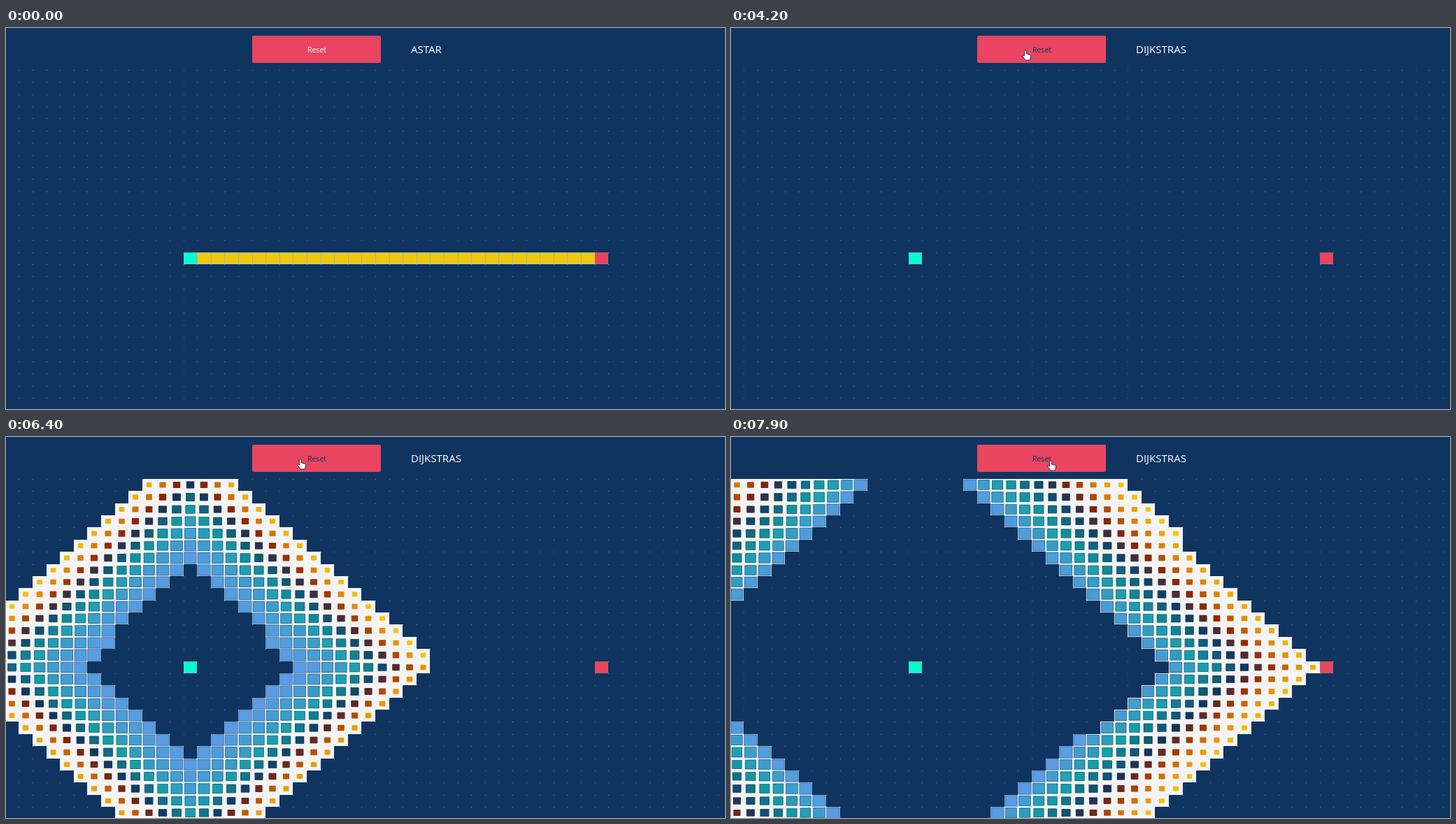
Animation, 1028 px wide and 545 px high, one loop 8000 ms. Source, as an HTML page with a canvas:

```html
<!DOCTYPE html>
<html lang="en">
<head>
<meta charset="utf-8">
<title>Pathfinding</title>
<style>
  html, body { margin: 0; width: 100%; height: 100%; overflow: hidden; background: #0f3460; }
  canvas, svg { position: absolute; left: 0; top: 0; width: 1028px; height: 545px; }
  text { font-family: "Open Sans", "Noto Sans", sans-serif; fill: #fff; }
</style>
</head>
<body>
<canvas id="grid" width="1028" height="545"></canvas>
<svg viewBox="0 0 1028 545">
  <rect x="352" y="11" width="184" height="39" rx="2" fill="#e94560"/>
  <text id="reset" x="444.5" y="35" font-size="10.6" text-anchor="middle">Reset</text>
  <text id="algorithm" x="579" y="35.5" font-size="15" font-weight="500">ASTAR</text>
  <g id="menu">
    <path d="M579.5 54.5h70.5v75h-70.5zM579.5 92h70.5" fill="#0f3460" stroke="#fff" stroke-width="1.4"/>
    <text x="586.5" y="79.5" font-size="14.2">Dijkstras</text>
    <text x="586.5" y="117" font-size="14.2">AStar</text>
  </g>
  <path id="arrow" d="M0 0v10.2l2.4-2.2 1.6 3.6 1.8-.8-1.6-3.5h3.3z" fill="#fff" stroke="#17263a" stroke-width=".6"/>
  <path id="hand" d="M-1.3 8V1a1.3 1.3 0 0 1 2.6 0v4l5 1.2q1.5.4 1.3 2l-.5 3-1 2.8h-6l-4.2-5.6q-.6-1.5.8-1.4z" fill="#fff" stroke="#17263a" stroke-width=".9"/>
</svg>
<script>
const LOOP = 8000, TICK = 100, LIFE = 1480;
const COLS = 53, ROWS = 28;
const START = { c: 13, r: 15 }, GOAL = { c: 43, r: 15 };
const $ = id => document.getElementById(id);
const ctx = $('grid').getContext('2d');

const cellX = c => Math.round(-1.2 + 19.6 * c);
const cellY = r => Math.round(60 + 17.37 * r);
const smooth = p => p * p * (3 - 2 * p);

// Finds the segment of a table holding v (first entry of each row).
function segment(table, v) {
  let i = 0;
  while (i < table.length - 2 && v >= table[i + 1][0]) i++;
  const a = table[i], b = table[i + 1];
  const p = Math.min(1, Math.max(0, (v - a[0]) / (b[0] - a[0])));
  return { a, b, p };
}
const mix = (a, b, p) => a + (b - a) * p;

// Age in ms, then red, green, blue.
const TINTS = [
  [0, 243, 200, 10], [190, 232, 140, 4], [430, 143, 36, 2],
  [650, 16, 53, 95], [1020, 18, 158, 166], [LIFE, 93, 156, 230]
];
function tint(age) {
  const { a, b, p } = segment(TINTS, age);
  return `rgb(${[1, 2, 3].map(i => Math.round(mix(a[i], b[i], p)))})`;
}

function starVisits() {
  const cells = [];
  const add = (c, r, lead) => {
    const born = lead <= 22 ? 1260 : 1492 + 6.1 * (lead - 23);
    cells.push({ c, r, born });
  };
  add(12, 15, 12);
  for (let c = 13; c < 43; c++) {
    add(c, 14, c);
    if (c > 13) add(c, 15, c - 1);
    add(c, 16, c + 0.5);
  }
  return cells;
}

// Visit count against time.
const PACE = [
  [0, 4450], [60, 4470], [61, 4650], [112, 4730], [123, 4919.5], [229, 5098],
  [403, 5719], [593, 6398], [599, 6419], [830, 7199], [1010, 7898], [1050, 8060]
];
function floodVisits() {
  const queue = [START], seen = new Set([START.r * COLS + START.c]);
  for (let i = 0; i < queue.length && i < 1050; i++) {
    const { c, r } = queue[i];
    for (const [dc, dr] of [[0, -1], [1, 0], [0, 1], [-1, 0]]) {
      const n = { c: c + dc, r: r + dr }, key = n.r * COLS + n.c;
      if (n.c < 0 || n.r < 0 || n.c >= COLS || n.r >= ROWS || seen.has(key)) continue;
      seen.add(key);
      queue.push(n);
    }
  }
  return queue.slice(1, 1050).map((cell, i) => {
    const { a, b, p } = segment(PACE, i + 1);
    return { ...cell, born: mix(a[1], b[1], p) };
  });
}

const RUNS = [
  { from: 1400, cells: starVisits(), startTint: '#19f0d6' },
  { from: 4700, cells: floodVisits(), startTint: '#38e8c0' }
];

function fillCell({ c, r }, color) {
  const x = cellX(c), y = cellY(r);
  ctx.fillStyle = color;
  ctx.fillRect(x, y, cellX(c + 1) - x, cellY(r + 1) - y);
}

function outlined(cell, color, line) {
  fillCell(cell, color);
  const x = cellX(cell.c), y = cellY(cell.r);
  ctx.strokeStyle = line;
  ctx.lineWidth = 1;
  ctx.strokeRect(x + .5, y + .5, cellX(cell.c + 1) - x - 1, cellY(cell.r + 1) - y - 1);
}

function pathCell(c) {
  const x = cellX(c), y = cellY(15);
  fillCell({ c, r: 15 }, '#f0c90c');
  ctx.fillStyle = '#a2b9a0';
  ctx.fillRect(x, y, 1, 17);
  ctx.fillRect(x, y, 20, 1);
  ctx.fillRect(x, y + 16, 20, 1);
}

function visitedCell(cell, age, onPath) {
  const x = cellX(cell.c), y = cellY(cell.r);
  const w = cellX(cell.c + 1) - x, h = cellY(cell.r + 1) - y;
  const scale = .39 + .57 * (age / LIFE) ** 1.2;
  const iw = w * scale, ih = h * scale;
  const ix = x + (w - iw) / 2, iy = y + (h - ih) / 2;
  fillCell(cell, onPath && age > 1200 ? '#e6e8c4' : '#f4f4f5');
  ctx.beginPath();
  ctx.roundRect(ix, iy, iw, ih, age > 1350 ? 0 : 1);
  ctx.fillStyle = tint(age);
  ctx.fill();
  if (age > 600) {
    ctx.strokeStyle = 'rgba(25,60,85,.5)';
    ctx.lineWidth = .8;
    ctx.strokeRect(ix + .4, iy + .4, iw - .8, ih - .8);
  }
}

function drawGrid(t) {
  ctx.fillStyle = '#0f3460';
  ctx.fillRect(0, 0, 1028, 545);
  ctx.fillStyle = '#5d7c95';
  for (let c = 1; c < COLS; c++)
    for (let r = 0; r < ROWS; r++) ctx.fillRect(cellX(c), cellY(r), 1, 1);

  if (t < 800) for (let c = 14; c < 43; c++) pathCell(c);

  let startTint = '#00ffcc';
  for (const run of RUNS) {
    if (t < run.from) continue;
    if (t < run.from + 1200) startTint = run.startTint;
    for (const cell of run.cells) {
      const age = t - cell.born;
      const onPath = run === RUNS[0] && cell.r === 15 && cell.c > 13;
      if (age < 0) continue;
      if (age < LIFE) visitedCell(cell, age, onPath);
      else if (onPath && t < 4200) pathCell(cell.c);
    }
  }
  outlined(START, startTint, startTint === '#00ffcc' ? '#58c8c0' : startTint);
  outlined(GOAL, '#e94560', '#c05a60');
}

// Pointer stops: time, x, y.
const POINTER = [
  [100, 151, 6], [600, 459, 31], [2200, 459, 31], [2700, 603, 43], [3200, 603, 43],
  [3400, 612, 70], [3500, 612, 70], [4000, 421, 32], [7500, 421, 32], [7700, 457, 34], [LOOP, 457, 34]
];

function drawControls(t) {
  const { a, b, p } = segment(POINTER, t);
  const x = mix(a[1], b[1], smooth(p)), y = mix(a[2], b[2], smooth(p));
  const menuOpen = t >= 2700 && t < 3500;
  const onButton = t >= 100 && x > 352 && x < 536 && y > 11 && y < 50;
  const onLink = onButton || (menuOpen && y > 54);
  const show = (id, on) => { $(id).style.display = on ? '' : 'none'; };

  show('menu', menuOpen);
  show('hand', t >= 100 && onLink);
  show('arrow', t >= 100 && !onLink);
  for (const id of ['hand', 'arrow']) $(id).setAttribute('transform', `translate(${x} ${y})`);
  $('reset').style.fill = onButton ? '#0f3460' : '#fff';
  $('reset').style.fontWeight = onButton ? 400 : 500;
  $('algorithm').textContent = t < 3500 ? 'ASTAR' : 'DIJKSTRAS';
}

let shown = -1;
const begin = performance.now();
function frame() {
  const t = Math.floor(((performance.now() - begin) % LOOP) / TICK) * TICK;
  if (t !== shown) {
    shown = t;
    drawGrid(t);
    drawControls(t);
  }
  requestAnimationFrame(frame);
}
frame();
</script>
</body>
</html>
```
